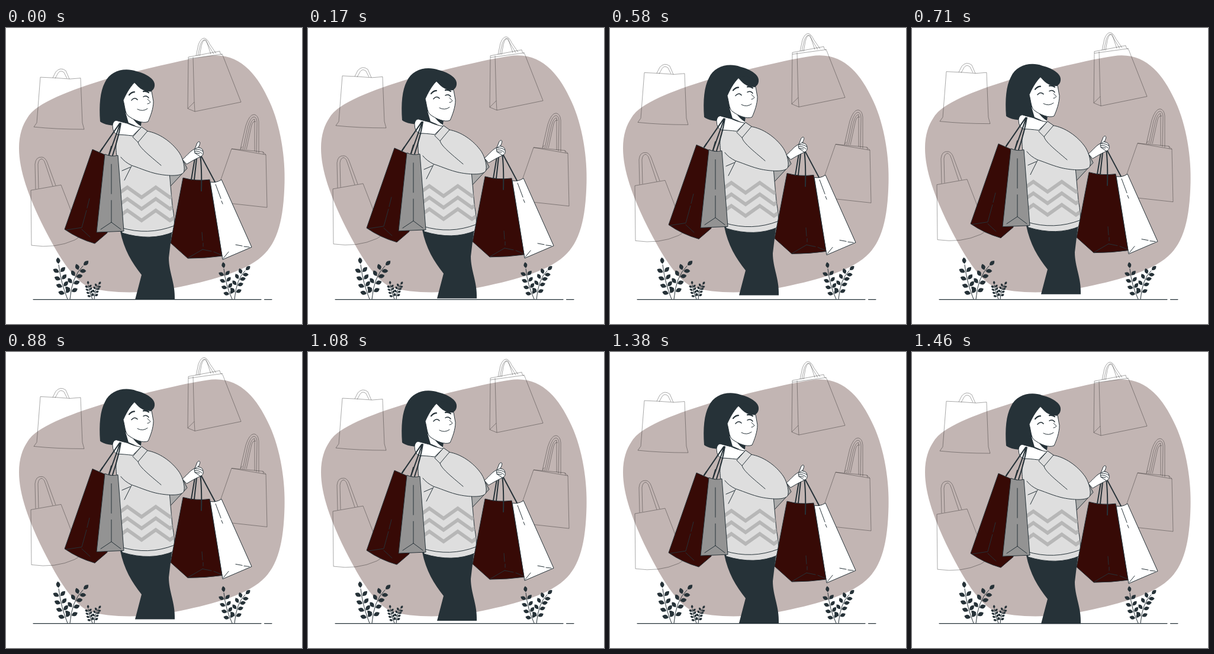
An HTML page for the animation above (1500 ms loop, 500x500 px).

```html
<!DOCTYPE html>
<html lang="en">
<head>
<meta charset="utf-8">
<title>Shopping</title>
<style>
  html, body { margin: 0; height: 100%; overflow: hidden; background: #fff; }
  svg { display: block; width: 100%; height: 100%; }
  .line { fill: none; stroke: #263238; stroke-linecap: round; stroke-linejoin: round; }
  .shape { stroke: #263238; stroke-linejoin: round; }
  .ghost { fill: none; stroke: #000; stroke-opacity: .34; stroke-linejoin: round; }
  .ink { fill: #263238; }
  .red { fill: #370a06; }
  .wool { fill: #dedede; }
  .white { fill: #fff; }
  .strap { stroke-width: 2; }
</style>
</head>
<body>
<svg viewBox="0 0 500 500">
  <path fill="#c2b5b3" d="M36 152C50 126 112 104 170 86C225 72 300 53 340 47.500C395 39 425 80 445 124C464 165 472 220 470.500 262C469 320 460 362 432 386C402 413 340 428 285 439C240 448 180 450 140 438C112 424 88 384 64 337C38 285 22 240 22 203C22 180 28 164 36 152Z"/>

  <g id="floating">
    <g class="ghost">
      <!-- upper left bag -->
      <path d="M58 83Q85 84 108 86L126 84.500L129 160L132 171Q85 171 47 167L52 160Z"/>
      <path d="M79 84L84 74Q92 65 101 72L107 86M83 85L88 76Q92 70 98 75L103 85"/>
      <!-- lower left bag -->
      <path d="M42 274L93 265L124 345Q128 352 116 358Q83 373 43 367Z"/>
      <path d="M50 272L49 230Q50 217 61 218Q67 219 70 228L84 266M55 271L54 230Q55 221 61 221Q65 223 67 231L79 267"/>
      <!-- upper right bag -->
      <path d="M308 49L361 39L362 43L366 46L397 125L319 141L307 136ZM308 52L366 44M316 49L318 125L307 136M318 125L319 141"/>
      <path d="M321 47L325 28Q329 17 335 17Q340 18 344 27L355 43M324 47L328 29Q331 20 335 20Q339 22 342 29L351 44M327 47L330 30Q333 18 338 20L346 44"/>
      <!-- right bag -->
      <path d="M381 204L434 209L439 214L441 303L350 293ZM381 204L439 214M434 209L435 213M396 205L399 200"/>
      <path d="M396 204L405 165Q411 146 419 146Q426 147 427 158L427 211M400 205L408 167Q413 150 419 150Q424 151 424 160L423 210M403 205L411 168Q415 153 420 154L420 208M406 205L414 168Q416 156 422 158"/>
    </g>

    <path class="ink" d="M193 343C199 374 213 397 229 417L218 459H285C286 430 275 413 275 388L281 338Z"/>

    <!-- far arm and sweater -->
    <path class="shape" fill="#ababab" d="M275 246L298 221L306 237L277 268Z"/>
    <path class="shape wool" d="M191 180C182 194 187 216 190 240L196 346Q245 361 284 344Q286 327 281 300L276 244L232 178Z"/>
    <clipPath id="body"><path d="M188 240L276 246L281 300L285 330L192 340Z"/></clipPath>
    <g id="knit" clip-path="url(#body)" fill="none" stroke="#b7b7b7" stroke-width="6"></g>
    <path class="line" d="M194 337Q240 351 284 334"/>
    <path class="wool" d="M191 181L214 180L224 191L238 174C258 177 280 192 293 211C300 222 303 238 300 244C294 252 265 249 250 245C235 241 222 235 212 232Q196 224 191 211Z"/>
    <path class="line" d="M238 174C258 177 280 192 293 211C300 222 303 238 300 244C294 252 265 249 250 245C235 241 222 235 212 232Q200 226 194 218M223 192C223 200 242 215 262 232M212 233L200 257M210 235L196 241"/>

    <!-- head -->
    <path class="ink" d="M159 158C157 130 159 107 167 92C176 72 200 66 220 73C240 78 253 88 251 98C250 106 243 110 233 106L222 165Q170 168 159 158Z"/>
    <path class="white" d="M202 143L207 160L228 169L229 156Z"/>
    <path class="ink" d="M212 150L229 158L228 166Q219 161 212 150Z"/>
    <path class="shape white" d="M217 92C224 100 234 105 246 107L249 124C249 136 244 149 240 158C232 162 216 156 206 148C201 143 201 133 198 122C202 113 208 101 217 92Z"/>
    <path class="ink" d="M217 91C222 100 233 109 246 107L249 98L230 88Z"/>
    <path class="line" stroke-width="2.200" d="M208 113Q212 108 217 108M232 107Q237 106 241 109"/>
    <path class="line" stroke-width="1.500" d="M212 122Q217 116 222 121M232 116Q238 113 241 118"/>
    <path class="line" d="M239 120L244 125Q242 128 239 128M222 137Q231 142 239 136"/>

    <!-- hand at the shoulder -->
    <path class="shape white" d="M180 164Q181 157 186 156L193 158L205 161Q218 167 228 168L214 182Q198 180 189 180Q180 178 180 164Z"/>
    <path class="shape wool" d="M214 184L229 167L239 174L223 193Z"/>

    <!-- bags on the left -->
    <path class="line strap" d="M192 161L159 209M193 161L174 214M194 161Q190 185 180 215"/>
    <path class="shape red" d="M146 205L99 340Q122 356 150 364L171 346L178 216L167 214Z"/>
    <path class="shape" fill="#939393" d="M167 213Q178 218 189 215L199 343L153 345Z"/>
    <path class="line" d="M141 288L137 304M136 308L128 337L102 341M128 340L142 353M178 230V280M178 291V328L160 340M178 328L194 340"/>
    <path class="line strap" d="M174 214L178 200M159 209L163 203"/>

    <!-- bags on the right -->
    <path class="shape white" d="M345 260Q355 262 364 256L415 370L366 391Z"/>
    <path class="shape red" d="M299 253Q321 259 344 256L365 385Q337 389 307 389L278 363Z"/>
    <path class="line" d="M354 264L363 288M364 292L366 297M388 366L399 368M402 369L411 370M376 378L367 389M331 345L332 359M333 363V369M332 374L308 388M332 374L347 377M351 378L363 383"/>
    <path class="line strap" d="M319 220L313 256M322 220L318 256M328 214Q331 236 330 275M328 213L353 260"/>

    <!-- far hand -->
    <path class="shape white" d="M298 222C307 214 312 207 319 204L323 194C326 190 329 192 327 197L325 202Q332 202 333 209Q334 215 329 217Q318 222 305 230Z"/>
    <path class="line" d="M325 201L318 205L319 211L328 217M320 205Q327 204 332 208M319 208Q326 207 331 212M319 211L327 212"/>
  </g>

  <path class="line" stroke-width="1.200" d="M46 458.600H431M436.500 458.600H449"/>
  <g id="plants" class="ink"></g>
</svg>
<script>
const $ = id => document.getElementById(id);
const LOOP = 1500, RISE = 10, START = 20, REST = .4;

$('knit').innerHTML = [0, 19.5, 39].map(y =>
  `<path d="M181 ${286 + y}l24 -17l24 17l24 -17l24 17l24 -17"/>`).join('');

// A curved stem with pairs of leaves and one leaf at the tip
function plant(x0, y0, cx, cy, x1, y1, pairs, size) {
  const leaf = (x, y, angle) =>
    `<path d="M0 0Q${size * .5} ${-size * .62} ${size} 0Q${size * .5} ${size * .62} 0 0" transform="translate(${x} ${y}) rotate(${angle}) translate(${size * .15})"/>`;
  let out = `<path class="line" d="M${x0} ${y0}Q${cx} ${cy} ${x1} ${y1}"/>`;
  for (let i = 0; i <= pairs; i++) {
    const t = i === pairs ? 1 : (i + .8) / (pairs + .8), u = 1 - t;
    const x = u * u * x0 + 2 * u * t * cx + t * t * x1;
    const y = u * u * y0 + 2 * u * t * cy + t * t * y1;
    const angle = Math.atan2(u * (cy - y0) + t * (y1 - cy), u * (cx - x0) + t * (x1 - cx)) * 180 / Math.PI;
    out += i === pairs ? leaf(x, y, angle) : leaf(x, y, angle - 55) + leaf(x, y, angle + 55);
  }
  return out;
}

$('plants').innerHTML = [
  [104, 458, 93, 432, 89, 400, 4, 11],
  [108, 458, 111, 420, 130, 402, 4, 11],
  [146, 458, 140, 445, 139, 434, 4, 6],
  [149, 458, 150, 442, 156, 434, 4, 6],
  [382, 458, 371, 435, 368, 407, 4, 10],
  [386, 458, 389, 424, 404, 410, 4, 10]
].map(p => plant(...p)).join('');

function draw() {
  const t = (performance.now() + START) % LOOP / LOOP;
  const y = REST - RISE * (1 - Math.abs(1 - 2 * t));
  $('floating').setAttribute('transform', `translate(0 ${y})`);
  requestAnimationFrame(draw);
}
draw();
</script>
</body>
</html>
```
